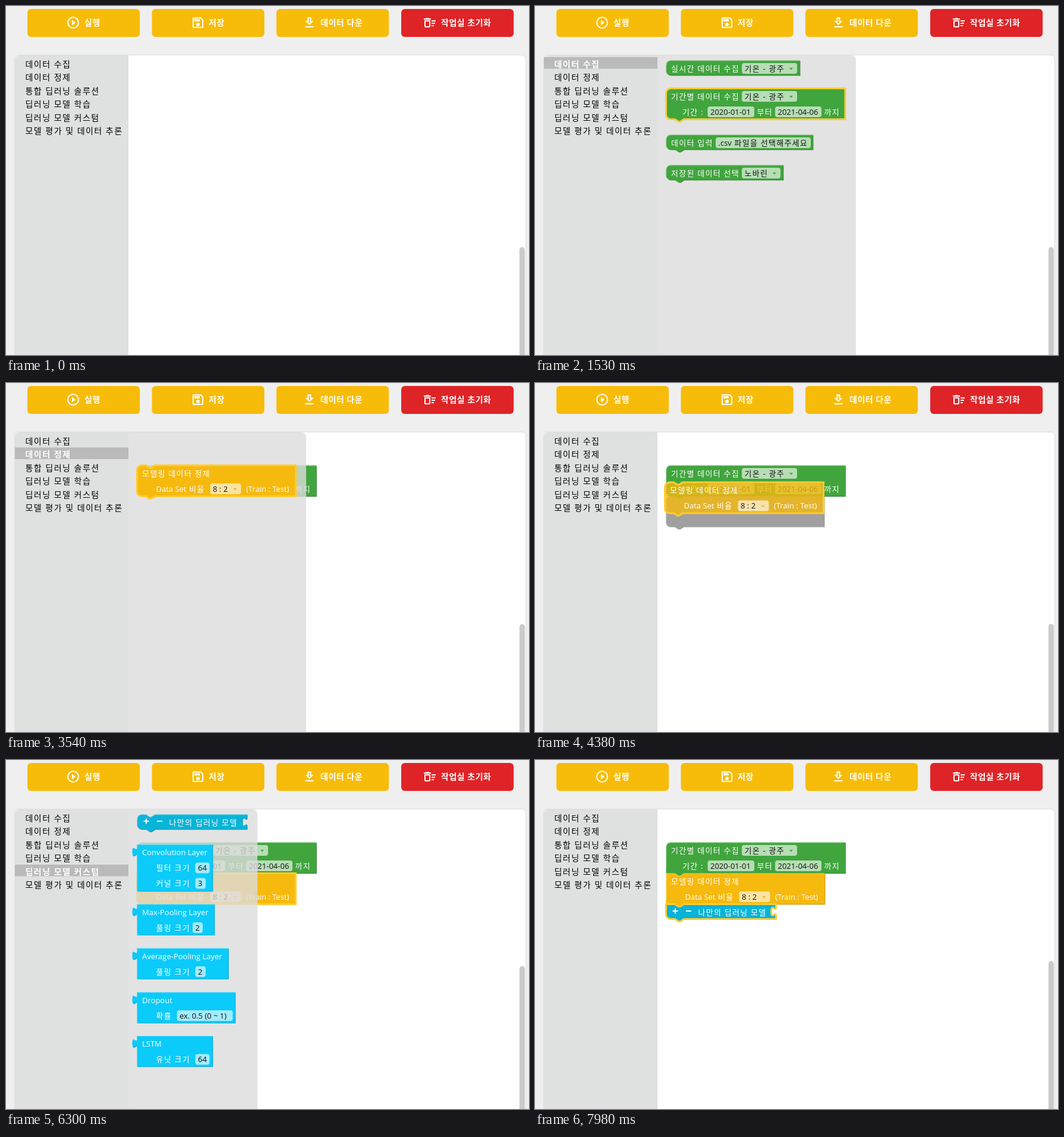
An HTML page with a canvas for the animation above (8 s loop, 880x587 px).

```html
<!DOCTYPE html>
<html lang="ko">
<head>
<meta charset="utf-8">
<style>
  html, body { margin: 0; width: 100%; height: 100%; overflow: hidden; background: #efefef; }
  canvas { display: block; }
</style>
</head>
<body>
<canvas id="stage" width="880" height="587"></canvas>
<script>
const ctx = document.getElementById('stage').getContext('2d');
const LOOP = 8000;
const FONT = '"Open Sans", "Noto Sans CJK KR", "Noto Sans CJK", sans-serif';
const GREEN = '#41a53e', YELLOW = '#f6b90e', CYAN = '#0bcbfa', TEAL = '#08b4d8', RED = '#df2427';

const MENU = ['데이터 수집', '데이터 정제', '통합 딥러닝 솔루션', '딥러닝 모델 학습',
  '딥러닝 모델 커스텀', '모델 평가 및 데이터 추론'];

const BUTTONS = [
  { label: '실행', x: 36, iconX: 113, textX: 132, color: '#f7bc0a',
    icon: 'M10 16.5l6-4.5-6-4.5zM12 2a10 10 0 1 0 0 20a10 10 0 1 0 0-20zm0 18a8 8 0 1 1 0-16a8 8 0 1 1 0 16z' },
  { label: '저장', x: 245.5, iconX: 323, textX: 341, color: '#f7bc0a',
    icon: 'M17 3H5a2 2 0 0 0-2 2v14a2 2 0 0 0 2 2h14a2 2 0 0 0 2-2V7zm2 16H5V5h11.2L19 7.8zm-7-7a3 3 0 1 0 0 6a3 3 0 1 0 0-6zM6 6h9v4H6z' },
  { label: '데이터 다운', x: 455, iconX: 510.5, textX: 529, color: '#f7bc0a',
    icon: 'M19 9h-4V3H9v6H5l7 7zm-8 2V5h2v6h1.2L12 13.2 9.8 11zm-6 7h14v2H5z' },
  { label: '작업실 초기화', x: 665, iconX: 713, textX: 732, color: RED,
    icon: 'M15 16h4v2h-4zm0-8h7v2h-7zm0 4h6v2h-6zM3 18a2 2 0 0 0 2 2h6a2 2 0 0 0 2-2V8H3zm2-8h6v8H5zm5-6H6L5 5H2v2h12V5h-3z' }
];

// Block parts: [x, row, text, field width, has arrow]
const BLOCKS = {
  live: { w: 225, h: 25, color: GREEN,
    parts: [[8.5, 0, '실시간 데이터 수집'], [127.5, 0, '기온 - 광주', 93, true]] },
  period: { w: 301.5, h: 52, color: GREEN, bottom: true,
    parts: [[8.5, 0, '기간별 데이터 수집'], [127.5, 0, '기온 - 광주', 93, true], [27.5, 1, '기간 :'],
      [70, 1, '2020-01-01', 78.5], [153, 1, '부터'], [183.5, 1, '2021-04-06', 78], [266, 1, '까지']] },
  input: { w: 247, h: 25, color: GREEN, bottom: true,
    parts: [[8.5, 0, '데이터 입력'], [83.5, 0, '.csv 파일을 선택해주세요', 160]] },
  saved: { w: 197, h: 25, color: GREEN, bottom: true,
    parts: [[8.5, 0, '저장된 데이터 선택'], [127.5, 0, '노바린', 65, true]] },
  refine: { w: 267, h: 52, color: YELLOW, top: true, bottom: true,
    parts: [[8.5, 0, '모델링 데이터 정제'], [32, 1, 'Data Set 비율'],
      [123, 1, '8 : 2', 52, true], [183.5, 1, '(Train : Test)']] },
  custom: { w: 185, h: 25, color: TEAL, top: true, bottom: true, socket: true, signs: true,
    parts: [[54, 0, '나만의 딥러닝 모델']] },
  conv: { w: 127, h: 78.5, color: CYAN, tab: true,
    parts: [[8.5, 0, 'Convolution Layer'], [32, 1, '필터 크기'], [98, 1, '64', 24],
      [32, 2, '커널 크기'], [98, 2, '3', 17.5]] },
  maxPool: { w: 130, h: 51.5, color: CYAN, tab: true,
    parts: [[8.5, 0, 'Max-Pooling Layer'], [32, 1, '풀링 크기'], [93.5, 1, '2', 17]] },
  avgPool: { w: 153.5, h: 51.5, color: CYAN, tab: true,
    parts: [[8.5, 0, 'Average-Pooling Layer'], [32, 1, '풀링 크기'], [98, 1, '2', 17.5]] },
  dropout: { w: 165, h: 51.5, color: CYAN, tab: true,
    parts: [[8.5, 0, 'Dropout'], [32, 1, '확률'], [67, 1, 'ex. 0.5 (0 ~ 1)', 94]] },
  lstm: { w: 127, h: 51.5, color: CYAN, tab: true,
    parts: [[8.5, 0, 'LSTM'], [32, 1, '유닛 크기'], [98, 1, '64', 24]] }
};

const LEFT = 220.5, PERIOD_Y = 138.5, REFINE_Y = 190.5, CUSTOM_Y = 242.5;

const FLYOUTS = [
  { from: 1350, to: 2100, row: 0, right: 540, picked: 'period', pickedAt: 1500,
    items: [['live', 91.5], ['period', PERIOD_Y], ['input', 216.5], ['saved', 267.5]] },
  { from: 3300, to: 3870, row: 1, right: 505, picked: 'refine', pickedAt: 3520,
    items: [['refine', PERIOD_Y]] },
  { from: 5880, to: 6300, row: 5, right: 448, items: [] },
  { from: 6300, to: 7050, row: 4, right: 423, picked: 'custom', pickedAt: 6660,
    items: [['custom', 91.5], ['conv', 142], ['maxPool', 242.5], ['avgPool', 316.5],
      ['dropout', 390.5], ['lstm', 464]] }
];

const DRAGS = [
  { name: 'refine', from: 3870, to: 4830, dockY: REFINE_Y,
    path: [[4230, LEFT, PERIOD_Y], [4300, 216.5, 150], [4380, 218.5, 167], [4500, 218.5, 173.5]] },
  { name: 'custom', from: 7050, to: 7710, dockY: CUSTOM_Y,
    path: [[7050, LEFT, 91.5], [7380, 228.5, 236], [7550, 228.5, 236], [7560, 229.5, 238.5]] }
];

const HOVER = [[0, -1], [210, 3], [510, 2], [600, 1], [750, -1], [960, 0], [1350, -1], [2460, 1],
  [3300, -1], [4900, 4], [4980, 5], [5340, 4], [5500, 5], [5880, -1], [6150, 4], [6300, -1]];
const SCROLL_TOP = [[0, 405.5], [4830, 346.5], [7710, 338]];

const during = (t, span) => t >= span.from && t < span.to;
const stepAt = (t, steps) => steps.filter(s => s[0] <= t).pop()[1];

function pointAt(t, path) {
  if (t <= path[0][0]) return path[0].slice(1);
  for (let i = 1; i < path.length; i++) {
    const [t0, x0, y0] = path[i - 1], [t1, x1, y1] = path[i];
    if (t < t1) {
      const k = (t - t0) / (t1 - t0);
      return [x0 + (x1 - x0) * k, y0 + (y1 - y0) * k];
    }
  }
  return path[path.length - 1].slice(1);
}

function roundRect(x, y, w, h, r, color) {
  ctx.beginPath();
  ctx.roundRect(x, y, w, h, r);
  ctx.fillStyle = color;
  ctx.fill();
}

// Hangul runs, with the spaces and dashes between words, get wider tracking than Latin.
function text(str, x, centerY, color, size = 13, weight = 400, tracking = 1.25) {
  ctx.font = `${weight} ${size}px ${FONT}`;
  ctx.fillStyle = color;
  for (const run of str.split(/((?: ?-? ?[가-힣])+ ?)/)) {
    ctx.letterSpacing = /[가-힣]/.test(run) ? tracking + 'px' : '0px';
    ctx.fillText(run, x, centerY + size * 0.37);
    x += ctx.measureText(run).width;
  }
  ctx.letterSpacing = '0px';
}

function blockPath(b, joinTop, joinBottom) {
  return new Path2D(
    (joinTop || b.tab ? 'M0 0' : 'M0 8a8 8 0 0 1 8-8') +
    (b.top ? 'H15l6 4h3l6-4' : '') + `H${b.w}` +
    (b.socket ? 'v5c0 10-8-8-8 7.5s8-2.5 8 7.5' : '') + `V${b.h}` +
    (b.bottom ? 'H30l-6 4h-3l-6-4' : '') +
    (joinBottom || b.tab ? 'H0' : 'H8a8 8 0 0 1-8-8') +
    (b.tab ? 'V20c0-10-8 8-8-7.5s8 2.5 8-7.5' : '') + 'Z');
}

function drawPart([x, row, str, fieldWidth, arrow], color) {
  const y = 13.5 + 26 * row;
  if (!fieldWidth) return text(str, x, y, '#fff');
  roundRect(x, y - 9, fieldWidth, 18, 4, 'rgba(255,255,255,.62)');
  text(str, x + 4.5, y, '#111');
  if (arrow) {
    const ax = x + fieldWidth - 13;
    ctx.fillStyle = color;
    ctx.fill(new Path2D(`M${ax} ${y - 1}h6l-3 3.5z`));
  }
}

function drawBlock(name, x, y, { selected, joinTop, joinBottom, alpha = 1, marker } = {}) {
  const b = BLOCKS[name], path = blockPath(b, joinTop, joinBottom);
  ctx.save();
  ctx.translate(x, y);
  ctx.globalAlpha = alpha;
  if (!selected && !marker) {
    ctx.save();
    ctx.translate(0.8, 0.8);
    ctx.fillStyle = b.color;
    ctx.fill(path);
    ctx.fillStyle = 'rgba(0,0,0,.25)';
    ctx.fill(path);
    ctx.restore();
  }
  ctx.fillStyle = marker ? '#a0a0a0' : b.color;
  ctx.fill(path);
  ctx.globalAlpha = 1;
  if (selected) {
    ctx.strokeStyle = '#fc3';
    ctx.lineWidth = 3;
    ctx.stroke(path);
  } else if (!marker) {
    ctx.strokeStyle = 'rgba(255,255,255,.3)';
    ctx.lineWidth = 1;
    const corner = joinTop || b.tab ? 'V.5' : 'V8A7.5 7.5 0 0 1 8 .5';
    ctx.stroke(new Path2D(`M.5 ${b.tab ? 20 : b.h - 8}${b.tab ? 'M.5 .5' : corner}${b.top ? 'H15l6 4h3l6-4' : ''}H${b.w}`));
  }
  if (!marker) {
    b.parts.forEach(part => drawPart(part, b.color));
    if (b.signs) {
      ctx.strokeStyle = '#fff';
      ctx.lineWidth = 2;
      ctx.stroke(new Path2D('M11 11.5h9m-4.5-4.5v9M33.5 11.5h9'));
    }
  }
  ctx.restore();
}

function drawHeader() {
  for (const b of BUTTONS) {
    roundRect(b.x, 5, 189.2, 47, 6, b.color);
    ctx.save();
    ctx.translate(b.iconX - 12, 16);
    ctx.fillStyle = '#fff';
    ctx.fill(new Path2D(b.icon), 'evenodd');
    ctx.restore();
    text(b.label, b.textX, 28, '#fff', 14, 700, 0.5);
  }
}

function drawSidebar(active, hover) {
  roundRect(15, 83, 191, 520, [8, 0, 0, 0], '#dfe0e0');
  MENU.forEach((label, i) => {
    const y = 86 + 22.5 * i, isActive = i === active;
    if (isActive) roundRect(15, y, 191, 19.5, 0, '#bababa');
    else if (i === hover) roundRect(15, y, 191, 19.5, 0, '#e6e6e6');
    text(label, 32.5, y + 11.5, isActive ? '#fff' : '#000', 14, isActive ? 700 : 400, 1.48);
  });
}

function drawWorkspace(t) {
  const refineDocked = t >= 4830, customDocked = t >= 7710;
  if (t >= 2100) {
    drawBlock('period', LEFT, PERIOD_Y, { selected: t < 2310, joinBottom: refineDocked });
  }
  if (refineDocked) {
    drawBlock('refine', LEFT, REFINE_Y, { selected: t < 7050, joinTop: true, joinBottom: customDocked });
  }
  if (customDocked) drawBlock('custom', LEFT, CUSTOM_Y, { selected: true, joinTop: true });
}

function drawFlyout(flyout, t) {
  roundRect(206, 83, flyout.right - 206, 520, [0, 8, 0, 0], 'rgba(221,221,221,.8)');
  for (const [name, y] of flyout.items) {
    drawBlock(name, LEFT, y, { selected: name === flyout.picked && t >= flyout.pickedAt });
  }
}

function drawDrag(drag, t) {
  const [x, y] = pointAt(t, drag.path);
  if (drag.dockY - y < 40) drawBlock(drag.name, LEFT, drag.dockY, { marker: true });
  drawBlock(drag.name, x, y, { selected: true, alpha: 0.8 });
}

function draw(t) {
  ctx.fillStyle = '#efefef';
  ctx.fillRect(0, 0, 880, 587);
  drawHeader();
  roundRect(14, 82, 861, 520, 7, '#dedede');
  roundRect(15, 83, 859, 520, 6, '#fff');
  drawWorkspace(t);
  roundRect(864, stepAt(t, SCROLL_TOP), 9, 300, 4.5, '#cbcbcb');
  const flyout = FLYOUTS.find(f => during(t, f));
  if (flyout) drawFlyout(flyout, t);
  drawSidebar(flyout ? flyout.row : -1, stepAt(t, HOVER));
  const drag = DRAGS.find(d => during(t, d));
  if (drag) drawDrag(drag, t);
}

let start;
function tick(now) {
  start ??= now;
  draw((now - start) % LOOP);
  requestAnimationFrame(tick);
}
requestAnimationFrame(tick);
</script>
</body>
</html>
```
